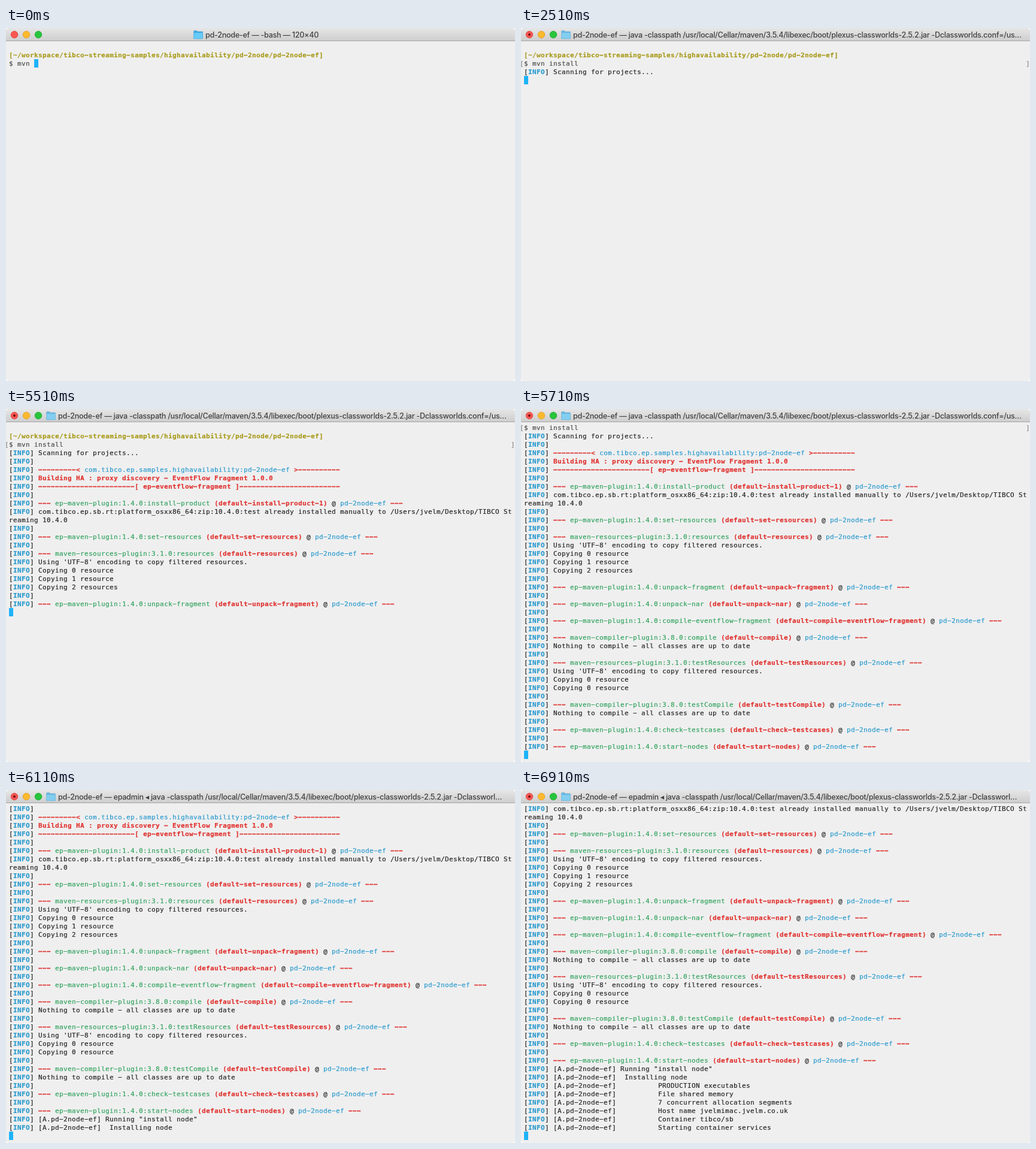
An HTML page for the animation above (8000 ms loop, 850x589 px).

```html
<!DOCTYPE html>
<html lang="en">
<head>
<meta charset="utf-8">
<title>Terminal</title>
<style>
  html, body { margin: 0; width: 100%; height: 100%; overflow: hidden; background: #fff; }
  #window {
    position: relative; width: 850px; height: 589px; overflow: hidden;
    background: #efefef; border-radius: 5px;
  }
  #bar {
    position: absolute; inset: 0 0 auto; height: 21px;
    background: linear-gradient(#e6e6e6, #cecece); border-bottom: 1px solid #a5a5a5;
  }
  #bar svg { position: absolute; left: 0; top: 0; }
  #title {
    position: absolute; top: 1px; line-height: 21px; white-space: pre; color: #404040;
    font: 500 12.5px/21px Inter, "DejaVu Sans", sans-serif; letter-spacing: -.23px;
  }
  #screen {
    position: absolute; left: 5px; top: 24px; color: #262626; white-space: pre;
    font: 11px/14px "DejaVu Sans Mono", monospace; letter-spacing: calc(7px - 1ch);
    -webkit-text-stroke: .2px;
  }
  #rows { position: relative; top: 1px; }
  #rows div { position: relative; height: 14px; }
  #cursor { position: absolute; width: 7px; height: 14px; background: #1fb3f9; }
  .prompt { color: #a99b1c; }
  .command { color: #4c4c4c; }
  .mark { position: absolute; top: 0; color: #8a8a8a; }
  .info, .name { color: #2a9ace; }
  .red { color: #e03431; }
  .green { color: #32a35f; }
</style>
</head>
<body>
<div id="window">
  <div id="bar">
    <svg width="850" height="21">
      <g stroke-width=".8">
        <circle cx="14" cy="11" r="5.8" fill="#fc5652" stroke="#dc3f3a"/>
        <circle cx="34" cy="11" r="5.8" fill="#fdb92d" stroke="#dc9a26"/>
        <circle cx="54" cy="11" r="5.8" fill="#28c53c" stroke="#1ba52c"/>
      </g>
      <circle id="dot" cx="14" cy="11" r="2" fill="#6e0c0a"/>
      <g id="folder">
        <path d="M.5 13V1.5q0-1 1-1h4l1.5 1.5h7.5q1 0 1 1v10q0 1-1 1h-13q-1 0-1-1z" fill="#44abe2" stroke="#3b9bd0" stroke-width=".6"/>
        <path d="M.8 4.2h14.4v8.6q0 .9-.9.9H1.7q-.9 0-.9-.9z" fill="#67cbf8"/>
      </g>
    </svg>
    <div id="title"></div>
  </div>
  <div id="screen"><div id="cursor"></div><div id="rows"></div></div>
</div>
<script>
const $ = id => document.getElementById(id);
const LOOP = 8000, ROWS = 40, CELL = 7, LINE = 14;

// The terminal face has wide dashes, so hyphens are set as minus signs.
const text = s => s.replace(/-/g, '\u2212').replace(/</g, '&lt;').replace(/>/g, '&gt;');
const span = (cls, s) => `<span class="${cls}">${text(s)}</span>`;
const bold = (cls, s) => `<b class="${cls}">${text(s)}</b>`;
const red = s => bold('red', s);
const dashes = n => '-'.repeat(n);

const PROJECT = 'pd-2node-ef';
const raw = html => `[${bold('info', 'INFO')}] ${html}`;
const info = (s = '') => raw(text(s));
const goal = (plugin, id) => [info(), raw(
  `${red('---')} ${span('green', plugin)} ${red(`(default-${id})`)} @ ${span('name', PROJECT)} ${red('---')}`)];
const ep = (name, id = name) => goal('ep-maven-plugin:1.4.0:' + name, id);
const resources = (name, counts) => [
  ...goal('maven-resources-plugin:3.1.0:' + name, name),
  info("Using 'UTF-8' encoding to copy filtered resources."),
  ...counts.map(n => info(`Copying ${n} resource${n > 1 ? 's' : ''}`))];
const compile = name => [
  ...goal('maven-compiler-plugin:3.8.0:' + name, name),
  info('Nothing to compile - all classes are up to date')];
const node = s => info(`[A.${PROJECT}] ${s}`);
const detail = s => node(' '.repeat(9) + s);

const output = [
  info('Scanning for projects...'),
  info(),
  raw(`${red(dashes(9) + '<')} ${span('name', 'com.tibco.ep.samples.highavailability:' + PROJECT)} ${red('>' + dashes(10))}`),
  raw(red('Building HA : proxy discovery - EventFlow Fragment 1.0.0')),
  raw(red(`${dashes(23)}[ ep-eventflow-fragment ]${dashes(24)}`)),
  ...ep('install-product', 'install-product-1'),
  info('com.tibco.ep.sb.rt:platform_osxx86_64:zip:10.4.0:test already installed manually to /Users/jvelm/Desktop/TIBCO St'),
  text('reaming 10.4.0'),
  ...ep('set-resources'),
  ...resources('resources', [0, 1, 2]),
  ...ep('unpack-fragment'),
  ...ep('unpack-nar'),
  ...ep('compile-eventflow-fragment'),
  ...compile('compile'),
  ...resources('testResources', [0, 0]),
  ...compile('testCompile'),
  ...ep('check-testcases'),
  ...ep('start-nodes'),
  node('Running "install node"'),
  node(' Installing node'),
  detail('PRODUCTION executables'),
  detail('File shared memory'),
  detail('7 concurrent allocation segments'),
  detail('Host name jvelmimac.jvelm.co.uk'),
  detail('Container tibco/sb'),
  detail('Starting container services')
];

const JAVA = 'java -classpath /usr/local/Cellar/maven/3.5.4/libexec/boot/plexus-classworlds-2.5.2.jar -Dclassworl';
const titles = {
  bash: `${PROJECT} — -bash — 120×40`,
  java: `${PROJECT} — ${JAVA}ds.conf=/us…`,
  epadmin: `${PROJECT} — epadmin ◂ ${JAVA}…`
};

// time, title, letters typed, output lines (-1 before Enter)
const steps = [
  [0, 'bash', 0, -1],
  [500, 'bash', 1, -1],
  [700, 'bash', 3, -1],
  [1110, 'bash', 4, -1],
  [1310, 'bash', 6, -1],
  [1510, 'bash', 7, -1],
  [1710, 'java', 7, 0],
  [2510, 'java', 7, 1],
  [3510, 'java', 7, 5],
  [3710, 'java', 7, 7],
  [5510, 'java', 7, 19],
  [5710, 'java', 7, 38],
  [5910, 'java', 7, 39],
  [6110, 'epadmin', 7, 40],
  [6710, 'epadmin', 7, 45],
  [6910, 'epadmin', 7, 46]
];

function draw([, title, typed, count]) {
  const running = count >= 0;
  const command = '$ mvn ' + 'install'.slice(0, typed);
  const marks = running
    ? '<span class="mark" style="left:-7px">[</span><span class="mark" style="left:838px">]</span>' : '';
  const lines = [
    '',
    bold('prompt', `[~/workspace/tibco-streaming-samples/highavailability/pd-2node/${PROJECT}]`),
    span('command', command) + marks,
    ...output.slice(0, Math.max(0, count))
  ];
  const scroll = Math.max(0, lines.length + 1 - ROWS);
  $('rows').innerHTML = lines.slice(scroll).map(l => `<div>${l}</div>`).join('');

  const row = running ? lines.length - scroll : 2;
  $('cursor').style.left = (running ? 0 : command.length * CELL) + 'px';
  $('cursor').style.top = row * LINE + 'px';

  $('title').textContent = titles[title];
  $('title').style.left = (running ? 87 : 333) + 'px';
  $('folder').setAttribute('transform', `translate(${running ? 67 : 313} 4)`);
  $('folder').setAttribute('opacity', running ? .75 : 1);
  $('dot').setAttribute('visibility', running ? 'visible' : 'hidden');
}

let shown;
const start = performance.now();
function tick() {
  const t = (performance.now() - start) % LOOP;
  const step = steps.findLast(s => s[0] <= t);
  if (step !== shown) draw(shown = step);
  requestAnimationFrame(tick);
}
tick();
</script>
</body>
</html>
```
